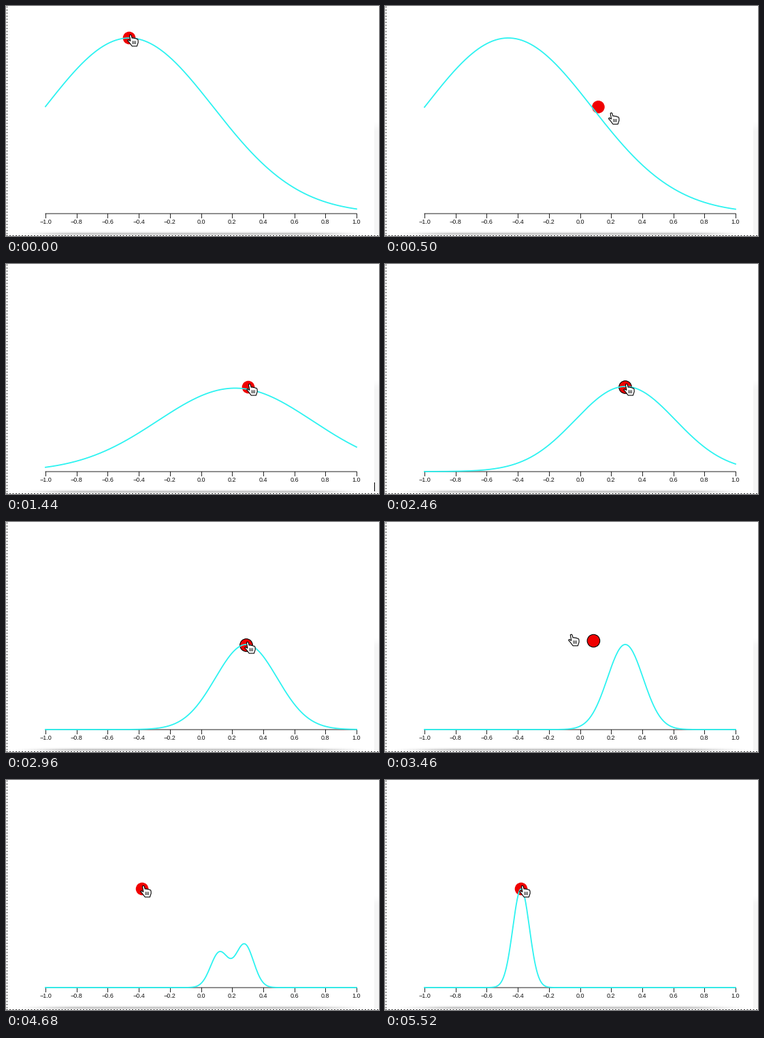
A matplotlib script that plays this animation: 548 by 338 pixels, repeating every 5660 ms.

```python
import numpy as np
import matplotlib.pyplot as plt
from matplotlib.animation import FuncAnimation
from matplotlib.patches import Circle, Polygon

W, H, DPI = 548, 338, 128
STEP, LOOP = 20, 5660
PX = 72 / DPI
BASE, LEFT, RIGHT = 305, 58, 515
LEAD = 46  # ms by which the pointer runs ahead of the dot

xs = np.linspace(LEFT, RIGHT, 320)


def smooth(u):
    u = np.clip(u, 0, 1)
    return u * u * (3 - 2 * u)


def ease_in(u):
    return np.clip(u, 0, 1) ** 2


def travel(t, origin, ease, *moves):
    """Add up eased moves, each given as (start, duration, shift)."""
    return origin + sum(ease((t - t0) / d) * np.asarray(by) for t0, d, by in moves)


def dot_pos(t):
    return travel(t, np.array([181.0, 47.0]), smooth,
                  (120, 560, (175, 134)), (1940, 400, (-3, 0)),
                  (3350, 300, (-153, -21)))


def curve_y(t):
    """Two bumps of one width chase the dot, the second one lagging."""
    lead = travel(t, 181, ease_in, (620, 820, 172), (4300, 750, -153))
    lag = travel(t, 181, ease_in, (620, 960, 172), (4560, 940, -153))
    height = travel(travel(t, 0, smooth), 0, smooth) if False else None
    height = (travel(t, 258, ease_in, (540, 900, -133))
              + travel(t, 0, smooth, (4200, 450, -10), (4900, 580, 30)))
    width = 12 + 108 / (1 + np.exp((t - 2590) / 460)) + 4 * smooth((1000 - t) / 440)
    share = .73 - .06 * t / 1000

    def bump(mean):
        return np.exp(-((xs - mean) / width) ** 2 / 2)

    return BASE - height * (share * bump(lead) + (1 - share) * bump(lag))


fig = plt.figure(figsize=(W / DPI, H / DPI), dpi=DPI, facecolor="white")
ax = fig.add_axes((0, 0, 1, 1))
ax.axis("off")


def stroke(x, y, color, width, z, **kw):
    return ax.plot(x, y, color=color, lw=width * PX, zorder=z, **kw)[0]


def shade(alpha, box):
    img = np.full(alpha.shape + (4,), 0.45)
    img[..., 3] = alpha
    ax.imshow(img, extent=box, aspect="auto", interpolation="bilinear", zorder=0)


# window edges
u = np.linspace(0, 1, 120)
fade = smooth(u / .2) * smooth((1 - u) / .2)
shade(np.linspace(0, .5, 6)[:, None] * fade, (5, 540, 336, 331))
shade(.07 * smooth(u / .1)[:, None] * np.ones(4), (541, 548, 336, 168))
dash = dict(linestyle=(0, (2, 2.5)), dash_capstyle="butt")
stroke((1, 1), (0, H), "#333333", 1, 1, **dash)
stroke((0, W), (337, 337), "#333333", 1, 1, **dash)

# axis
stroke((LEFT, RIGHT), (305.1, 305.1), "#222222", 1, 2, snap=False)
for i in range(11):
    x = LEFT + (RIGHT - LEFT) * i / 10
    stroke((x, x), (305, 311), "#222222", 1, 2)
    label = f"{(i - 5) / 5:.1f}".replace("-", "\u2212")
    ax.text(x, 320.2, label, ha="center", va="baseline", color="#111111",
            family="Liberation Sans", size=9 * PX)

# pointing hand, relative to the dot's centre
HAND = np.array([
    (.4, -4), (1.8, -4.8), (3, -4), (4.2, .2), (6, -.2), (7.2, .6), (8.8, .2),
    (10, 1.2), (12, 1.4), (13, 3), (13.2, 6.5), (11.4, 12), (4.2, 12),
    (.6, 7.2), (-2.2, 4), (-1.4, 2.6), (1.8, 4.4),
])
KNUCKLES = np.array([p for k in range(3)
                     for p in ((5 + 2.1 * k, 4.8), (5.3 + 2 * k, 8.6), (np.nan, np.nan))])

dot = ax.add_patch(Circle(dot_pos(0), 9.3, fc="#f00000", ec="black", zorder=3))
curve = stroke(xs, curve_y(0), "#2cf3f1", 1.8, 4)
caret = stroke((540.8, 540.8), (321, 333), "black", 1, 5)
hand = ax.add_patch(Polygon(HAND, fc="white", ec="black", lw=1.1 * PX,
                            joinstyle="round", zorder=6))
knuckles = stroke([], [], "black", 0.9, 7)

ax.set_xlim(0, W)
ax.set_ylim(H, 0)


def draw(i):
    t = i * STEP
    curve.set_ydata(curve_y(t))
    dot.set_center(dot_pos(t))
    dot.set_linewidth(1.1 * PX if 1930 < t < 3660 else 0)
    tip = dot_pos(t + LEAD)
    hand.set_xy(HAND + tip)
    knuckles.set_data(*(KNUCKLES + tip).T)
    caret.set_visible(1180 <= t < 1930)
    return dot, curve, caret, hand, knuckles


anim = FuncAnimation(fig, draw, frames=LOOP // STEP, interval=STEP,
                     repeat=True, repeat_delay=0)
plt.show()
```
